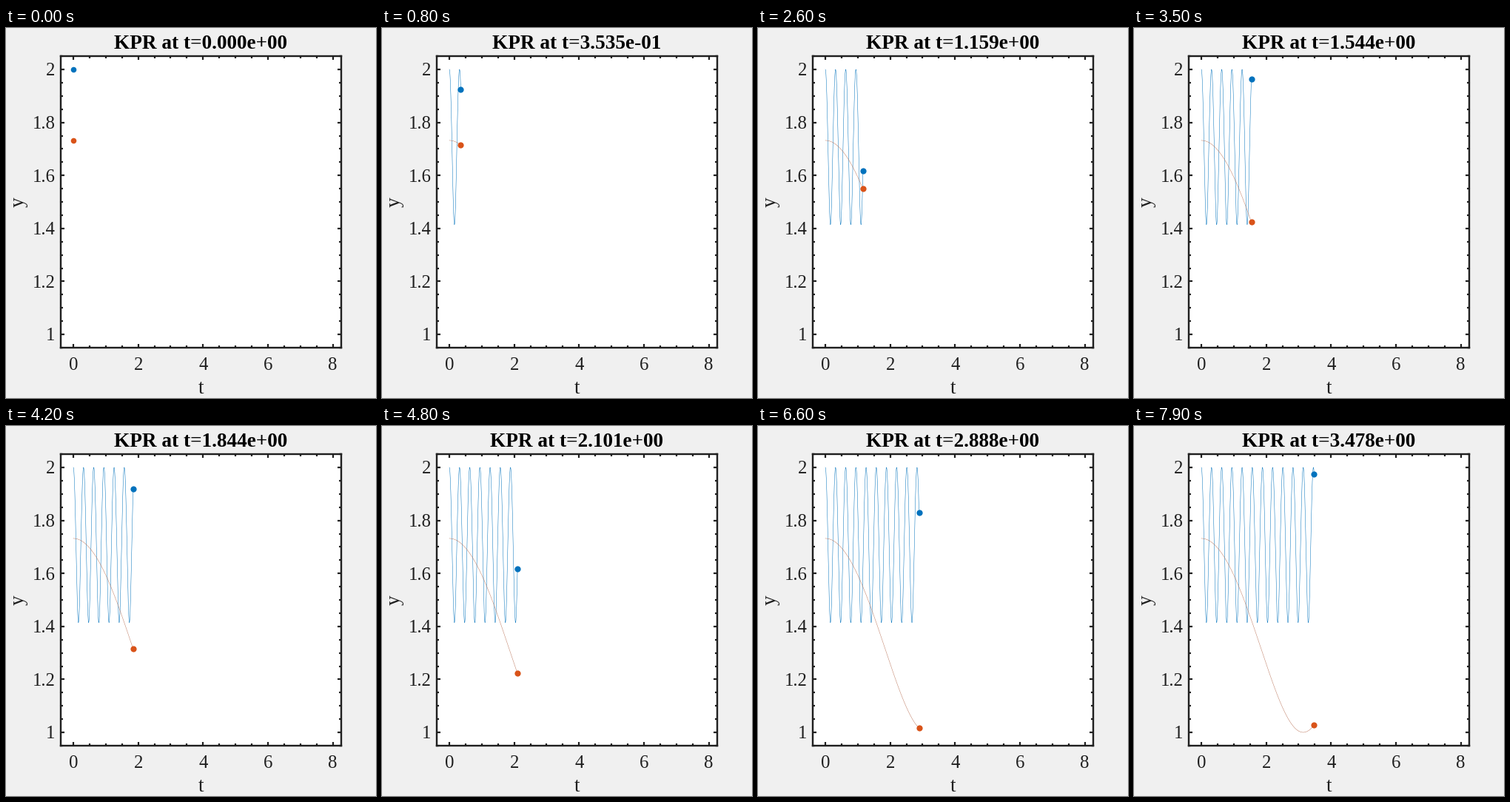
Write a matplotlib script that moves like this. It is 500 px wide and 500 px high and loops after 8000 ms.

```python
import numpy as np
import matplotlib.pyplot as plt
from matplotlib.animation import FuncAnimation
from matplotlib.ticker import MultipleLocator

SIZE, DPI = 500, 100
PX = 72 / DPI                 # points per pixel
FRAMES, INTERVAL = 80, 100
INK = "#1f1f1f"
BLUE, RED = "#0072bd", "#d95319"

# Axes box in pixels (top-left origin) and data scale
LEFT, RIGHT, TOP, BOTTOM = 74, 453, 38, 432
X0, X_UNIT = 91, 43.82
Y2, Y_UNIT = 56, 358

# Solver time reached at a few steps; the step size varies slightly
KNOT_STEP = [0, 8, 18, 27, 35, 36, 45, 48, 54, 63, 66, 72, 79]
KNOT_TIME = [0, 0.3535, 0.7869, 1.205, 1.544, 1.588, 1.972,
             2.101, 2.358, 2.780, 2.888, 3.150, 3.478]


def fast(t):
    return np.sqrt(3 + np.cos(20 * t))


def slow(t):
    return np.sqrt(2 + np.cos(t))


def px_x(v):
    return X0 + v * X_UNIT


def px_y(v):
    return Y2 + (2 - v) * Y_UNIT


def label(x, y, text, size, **kw):
    style = dict(family="Liberation Serif", color=INK, ha="center", va="baseline")
    style.update(kw)
    return fig.text(x / SIZE, 1 - y / SIZE, text, fontsize=size * PX, **style)


fig = plt.figure(figsize=(SIZE / DPI, SIZE / DPI), dpi=DPI, facecolor="#f0f0f0")
ax = fig.add_axes([LEFT / SIZE, 1 - BOTTOM / SIZE,
                   (RIGHT - LEFT) / SIZE, (BOTTOM - TOP) / SIZE], facecolor="white")
ax.set_xlim((LEFT - X0) / X_UNIT, (RIGHT - X0) / X_UNIT)
ax.set_ylim(2 - (BOTTOM - Y2) / Y_UNIT, 2 + (Y2 - TOP) / Y_UNIT)

ax.xaxis.set_major_locator(MultipleLocator(2))
ax.xaxis.set_minor_locator(MultipleLocator(0.5))
ax.yaxis.set_major_locator(MultipleLocator(0.2))
ax.yaxis.set_minor_locator(MultipleLocator(0.05))
ax.tick_params(which="both", direction="in", top=True, right=True, color=INK,
               width=2.2 * PX, labelbottom=False, labelleft=False)
ax.tick_params(which="major", length=5.2 * PX)
ax.tick_params(which="minor", length=3.4 * PX)
for spine in ax.spines.values():
    spine.set(linewidth=2.4 * PX, color=INK)

for v in range(0, 9, 2):
    label(px_x(v), 462, str(v), 24.75)
for v in np.linspace(1, 2, 6):
    label(66.5, px_y(v) + 8.5, f"{v:g}", 24.75, ha="right")
label(263.5, 494, "t", 27.2)
label(24, 235, "y", 27.2, rotation=90, rotation_mode="anchor")
title = label(263, 28, "", 27.3, weight="bold", color="black")

curves = []
for func, color, trail_color, width in ((fast, BLUE, BLUE, 0.5),
                                        (slow, RED, "#b4674a", 0.42)):
    trail, = ax.plot([], [], color=trail_color, lw=width * PX, zorder=3)
    dot, = ax.plot([], [], "o", color=color, mew=0, zorder=5)
    curves.append((func, trail, dot))


def update(i):
    now = np.interp(i, KNOT_STEP, KNOT_TIME)
    t = np.linspace(0, now, 12 * i + 1)
    for func, trail, dot in curves:
        trail.set_data(t, func(t))
        dot.set_data([now], [func(now)])
        dot.set_markersize((8.2 if i else 7.6) * PX)
    title.set_text(f"KPR at t={now:.3e}")
    return []


anim = FuncAnimation(fig, update, frames=FRAMES, interval=INTERVAL,
                     repeat=True, repeat_delay=0, blit=False)
plt.show()
```
